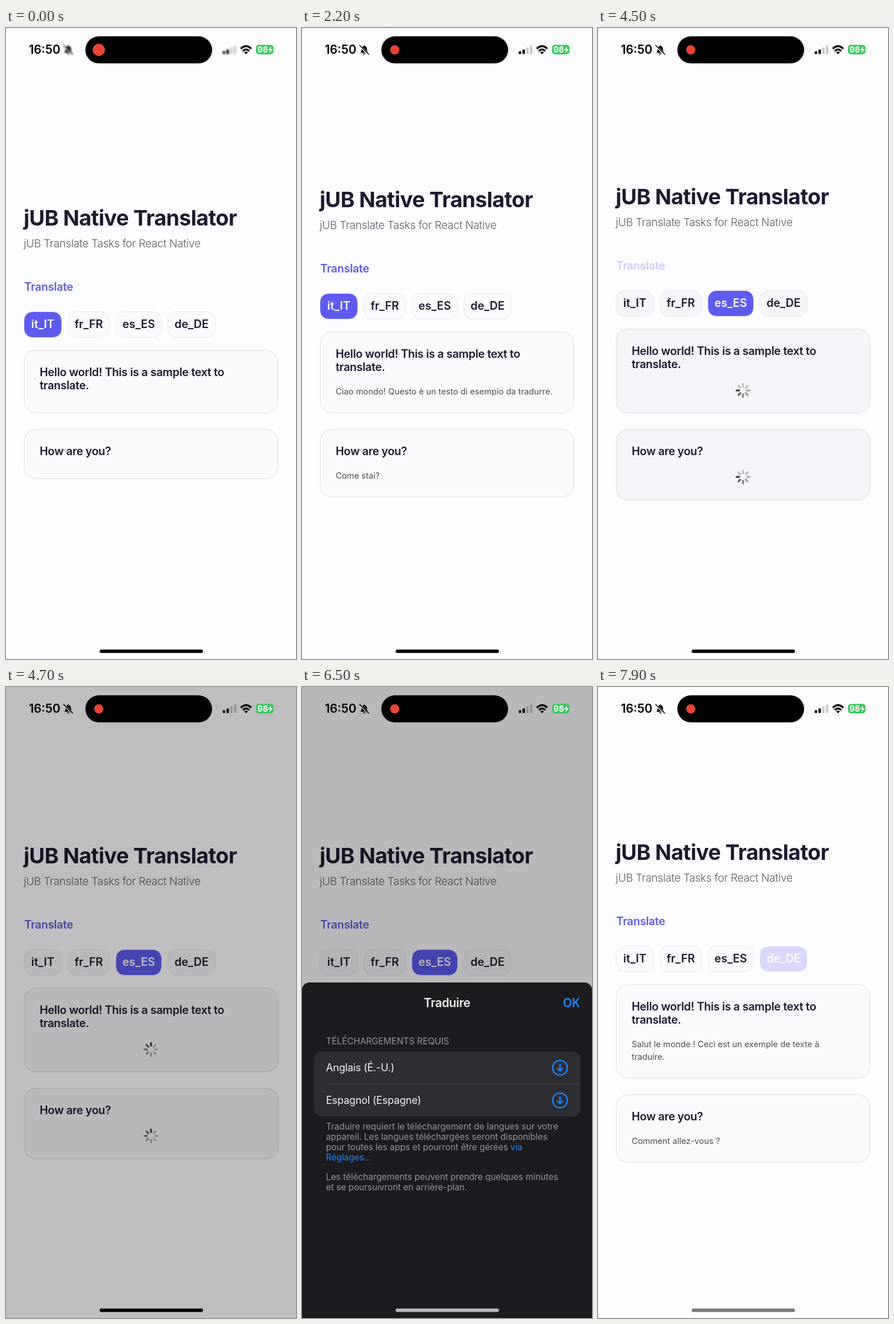
Recreate the animation shown at these times as an HTML page. Size 508 px wide and 1102 px high, loop 8000 ms.

```html
<!DOCTYPE html>
<html lang="en">
<head>
<meta charset="utf-8">
<title>Native Translator</title>
<style>
html, body { margin: 0; width: 100%; height: 100%; overflow: hidden; background: #fdfcff; }
#stage { position: absolute; left: 0; top: 0; width: 508px; height: 1102px; overflow: hidden;
  background: #fdfcff; color: #1c1a2e; font-family: Inter, "Liberation Sans", sans-serif;
  font-optical-sizing: none; font-weight: 600; font-size: 19.6px; letter-spacing: -.3px; }
#stage div, #stage svg { position: absolute; box-sizing: border-box; }
.t { white-space: pre; line-height: 24px; margin-top: -12px; }
#app { left: 0; top: 0; width: 508px; }
.title { left: 31px; top: 0; font-size: 37.5px; font-weight: 700; letter-spacing: -.016em; }
.sub { left: 31px; top: 45px; font-size: 19px; font-weight: 300; letter-spacing: -.26px; color: #5f5d69; }
#go { left: 32px; top: 120px; color: #5f5ce2; }
.chip { top: 163px; height: 46px; line-height: 43px; border: 1px solid #e9e8ee; border-radius: 15px;
  text-align: center; letter-spacing: 0; background: #fafafd; background-clip: padding-box; }
.chip.on { background-color: #5d5bee; color: #fff; border-color: #e4e3f4; }
.card { left: 31px; width: 446px; border: 2px solid #ebecf1; border-radius: 21px; background: #fafafd; }
.busy .chip:not(.on), .busy .card { background-color: #f6f5f9; border-color: #e9e8ee; }
.card .t { left: 26px; line-height: 23px; margin-top: -11.5px; }
.card .out { font-size: 14.7px; font-weight: 400; letter-spacing: 0; line-height: 22px; margin-top: -11px; color: #4d4b55; }
.spin { left: 205px; width: 32px; height: 32px; }
#dim { left: 0; top: 0; width: 508px; height: 1102px; background: #000; }
#sheet { left: 0; width: 508px; height: 620px; border-radius: 13px 13px 0 0; background: #1c1b1f; color: #f4f4f6; }
#sheet .t { left: 42px; }
#sheet .head { left: 0; width: 508px; text-align: center; font-size: 20.8px; }
#sheet .ok { left: auto; right: 21px; font-size: 20.8px; }
.ok, .link { color: #1c84fb; }
#sheet .cap { font-size: 15.5px; letter-spacing: -.1px; font-weight: 400; color: #98979d; }
.group { left: 21px; top: 121px; width: 467px; height: 113px; border-radius: 13px; background: #2e2d31; }
.rule { left: 21px; top: 56px; width: 446px; height: 1px; background: #3d3c40; }
#sheet .row { font-size: 18px; font-weight: 400; letter-spacing: -.2px; }
#sheet .note { font-size: 15.3px; font-weight: 400; letter-spacing: 0; line-height: 18px; margin-top: -9px; color: #98979d; }
#clock { left: 40px; top: 38px; font-size: 20.8px; letter-spacing: 0; color: #000; }
#home { left: 164px; top: 1085px; width: 181px; height: 6px; border-radius: 3px; transform: translateY(.5px); }
</style>
</head>
<body>
<div id="stage">
  <div id="app">
    <div class="t title">jUB Native Translator</div>
    <div class="t sub">jUB Translate Tasks for React Native</div>
    <div class="t" id="go">Translate</div>
  </div>
  <div id="dim"></div>
  <div id="sheet">
    <div class="t head" style="top:36px">Traduire</div>
    <div class="t ok" style="top:36px">OK</div>
    <div class="t cap" style="top:103px">TÉLÉCHARGEMENTS REQUIS</div>
    <div class="group"><div class="rule"></div></div>
    <div class="t row" style="top:149px">Anglais (É.-U.)</div>
    <div class="t row" style="top:206px">Espagnol (Espagne)</div>
    <svg style="left:437px;top:134px" width="30" height="88" fill="none" stroke="#1c84fb" stroke-width="2.5" stroke-linecap="round" stroke-linejoin="round">
      <g id="get"><circle cx="15" cy="15" r="12.8"/><path d="M15 9V20.5M10.5 16.2L15 20.7L19.5 16.2"/></g>
      <use href="#get" y="57"/>
    </svg>
    <div class="t note" style="top:252px">Traduire requiert le téléchargement de langues sur votre
appareil. Les langues téléchargées seront disponibles
pour toutes les apps et pourront être gérées <span class="link">via
Réglages…</span></div>
    <div class="t note" style="top:340px">Les téléchargements peuvent prendre quelques minutes
et se poursuivront en arrière-plan.</div>
  </div>
  <div class="t" id="clock">16:50</div>
  <svg style="left:0;top:0" width="508" height="76">
    <g id="soft">
      <path d="M102.5 42.5C105 40.5 103.7 37 105 34Q106.3 31.6 108.3 31.2Q109 28.8 109.8 31.2Q112 31.6 113.2 34C114.5 37 113.2 40.5 115.7 42.5V43.3H102.5ZM106.7 44.5H111.5Q109 48.2 106.7 44.5Z"/>
      <path d="M101 31L117 46.5" stroke="#fdfcff" stroke-width="3.6" id="gap"/>
      <path d="M101 30.3L117 46" stroke="#000" stroke-width="1.6" stroke-linecap="round"/>
      <g id="bars"></g>
    </g>
    <g fill="none" stroke="#000" stroke-width="3.3">
      <path d="M411.3 36.2Q420.5 27.5 429.7 36.2"/>
      <path d="M414.8 40.2Q420.5 35 426.2 40.2"/>
    </g>
    <path d="M417.2 42.6Q420.5 39.8 423.8 42.6L420.5 46Z"/>
    <rect x="438" y="29.5" width="30.5" height="16.5" rx="5" fill="#3cc75c"/>
    <path d="M469.5 35.5Q472 38 469.5 40.5Z" fill="#a5e2b3"/>
    <text x="440.3" y="43" font-size="14.5" font-weight="700" letter-spacing="-.3" fill="#fff">98</text>
    <path d="M464.5 32L459 39H462.6L461.5 44L467 37H463.4Z" fill="#fff"/>
    <rect x="139" y="14.6" width="222" height="47.2" rx="23.6"/>
    <circle id="dot" cx="162.5" cy="38.2" fill="#e84535"/>
  </svg>
  <div id="home"></div>
</div>
<script>
const LOOP = 8000, STEP = 100;
const $ = id => document.getElementById(id);
const app = $('app');

// Heights of both cards and the translated lines they show.
const views = {
  idle: { h: [111, 88], out: ['', ''] },
  load: { h: [148, 125], out: ['', ''], busy: true },
  it: { h: [143, 120], out: ['Ciao mondo! Questo è un testo di esempio da tradurre.', 'Come stai?'] },
  fr: { h: [165, 120], out: ['Salut le monde ! Ceci est un exemple de texte à\ntraduire.', 'Comment allez-vous ?'] }
};
const viewSteps = [[0, 'idle'], [700, 'load'], [1700, 'it'], [2900, 'load'], [3300, 'fr'], [4400, 'load'], [6900, 'fr']];
const pickSteps = [[0, 0], [2500, 1], [3900, 2], [7800, 3]];
const homeSteps = [[0, '#000'], [5400, '#59585c'], [5500, '#b9b8bc'], [6800, '#777679']];
const goKeys = [[400, 1], [500, .2], [700, .2], [900, 1], [2700, 1], [2800, .2], [2900, .2], [3100, 1],
  [4200, 1], [4300, .2], [4500, .3], [4700, 1]];
const dimKeys = [[4500, 0], [4700, .25], [5300, .27], [6500, .27], [6700, .025], [6800, 0]];
const dropKeys = [[6500, 516], [6600, 800], [6700, 1026], [6800, 1102]];
const dotKeys = [[0, 10.7], [300, 8.1]];
const blurKeys = [[0, 1.4], [200, 0]];

const hold = (steps, t) => steps.filter(s => s[0] <= t).pop()[1];

function mix(keys, t) {
  if (t <= keys[0][0]) return keys[0][1];
  for (let i = 1; i < keys.length; i++) {
    const [a, u] = keys[i - 1], [b, v] = keys[i];
    if (t <= b) return u + (v - u) * (t - a) / (b - a);
  }
  return keys[keys.length - 1][1];
}

function add(parent, cls, html = '') {
  const el = document.createElement('div');
  el.className = cls;
  el.innerHTML = html;
  parent.append(el);
  return el;
}

const chips = [['it_IT', 31, 67], ['fr_FR', 108, 74], ['es_ES', 192, 81], ['de_DE', 283, 84]].map(([name, x, w]) => {
  const el = add(app, 'chip', name);
  el.style.left = x + 'px';
  el.style.width = w + 'px';
  return el;
});

let spokes = '';
for (let i = 0; i < 8; i++)
  spokes += `<path d="M16 9.2V4.8" transform="rotate(${i * 45} 16 16)"/>`;

const cards = [
  ['Hello world! This is a sample text to\ntranslate.', 103, 106],
  ['How are you?', 80, 82]
].map(([text, outY, spinY]) => {
  const el = add(app, 'card');
  add(el, 't', text).style.top = '37.5px';
  const out = add(el, 't out');
  out.style.top = outY + 'px';
  const spin = add(el, 'spin', `<svg width="32" height="32" stroke="#000" stroke-width="3.4" stroke-linecap="round">${spokes}</svg>`);
  spin.style.top = spinY - 16 + 'px';
  return { el, out, spin, rays: [...spin.querySelectorAll('path')] };
});

$('bars').innerHTML = [5, 8, 11.5, 15].map((h, i) =>
  `<rect x="${379.7 + i * 6.5}" y="${45.5 - h}" width="4.2" height="${h}" rx="1.2" fill="${i < 2 ? '#000' : 'rgba(0,0,0,.2)'}"/>`).join('');

const fade = [.72, .6, .48, .38, .3, .24, .24, .24];

function sheetTop(t) {
  if (t >= 6500) return mix(dropKeys, t);
  const p = Math.min(1, Math.max(0, (t - 4700) / 600));
  return 1102 - 586 * (1 - (1 - p) ** 3);
}

function render(t) {
  const view = views[hold(viewSteps, t)];
  const [h1, h2] = view.h;
  app.style.top = 431.5 - (h1 + h2) / 2 + 'px';
  app.className = view.busy ? 'busy' : '';
  $('go').style.opacity = mix(goKeys, t);

  const pick = hold(pickSteps, t);
  chips.forEach((el, i) => {
    const at = pickSteps[i][0];
    el.className = i === pick ? 'chip on' : 'chip';
    el.style.opacity = i ? mix([[at - 200, 1], [at - 100, .2], [at + 100, .22], [at + 300, 1]], t) : 1;
  });

  const head = (t / STEP + 1) % 8;
  cards.forEach((card, i) => {
    card.el.style.top = 230 + i * (h1 + 27) + 'px';
    card.el.style.height = view.h[i] + 'px';
    card.out.textContent = view.out[i];
    card.spin.style.display = view.busy ? '' : 'none';
    card.rays.forEach((ray, k) => ray.setAttribute('stroke-opacity', fade[(head - k + 8) % 8]));
  });

  const dim = mix(dimKeys, t);
  const shade = c => Math.round(c * (1 - dim));
  $('dim').style.opacity = dim;
  $('gap').setAttribute('stroke', `rgb(${shade(253)},${shade(252)},${shade(255)})`);
  $('sheet').style.top = sheetTop(t) + 'px';
  $('home').style.background = hold(homeSteps, t);
  $('dot').setAttribute('r', mix(dotKeys, t));
  const blur = mix(blurKeys, t);
  $('soft').style.filter = blur ? `blur(${blur}px)` : 'none';
}

const start = performance.now();
function tick() {
  const t = (performance.now() - start) % LOOP;
  render(Math.floor(t / STEP) * STEP);
  requestAnimationFrame(tick);
}
tick();
</script>
</body>
</html>
```
